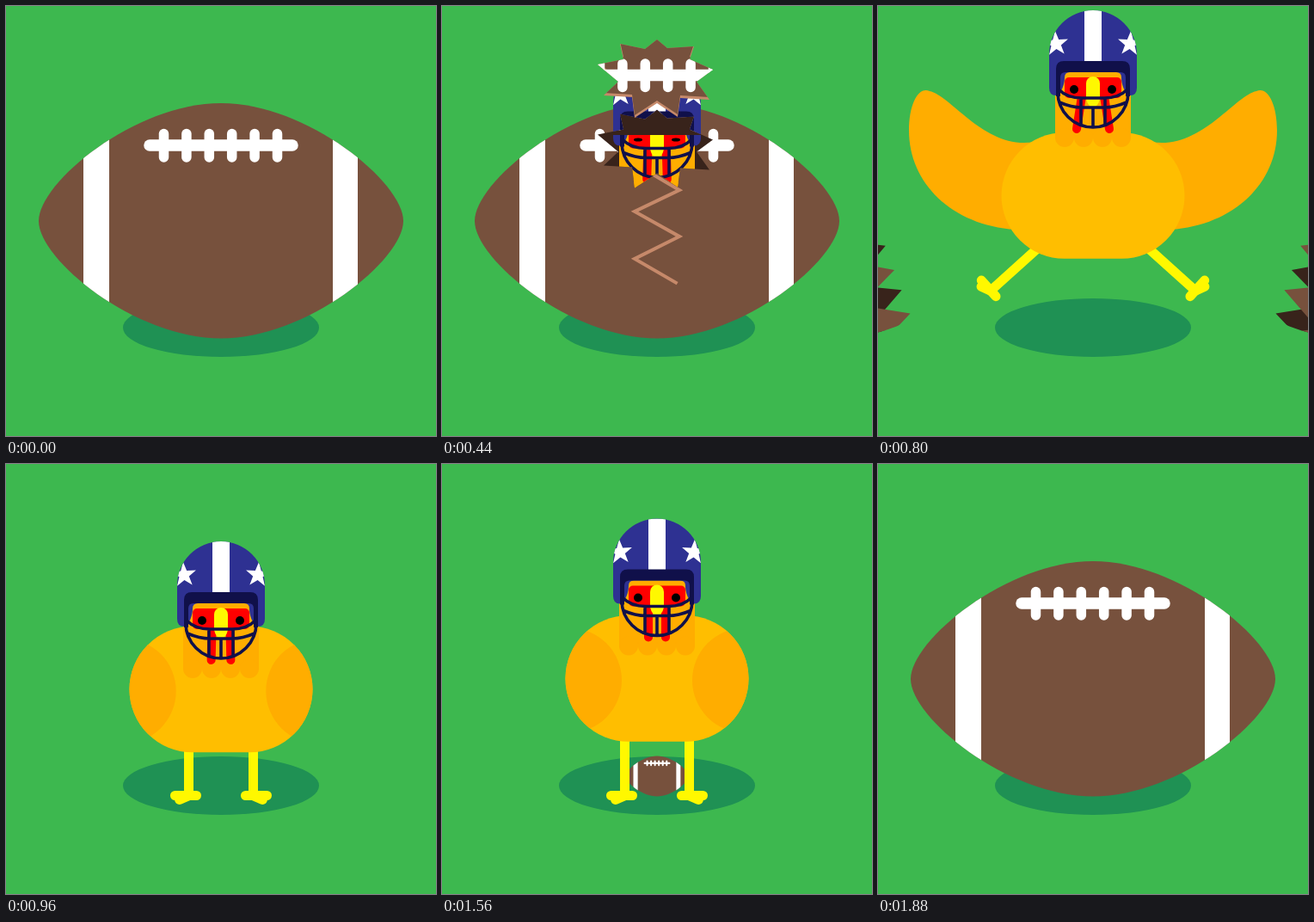
These frames come from a looping animation (500 px wide and 500 px high, 1.92 s). An HTML page with a canvas:

```html
<!DOCTYPE html>
<html>
<head>
<meta charset="utf-8">
<style>
html, body { margin: 0; width: 100%; height: 100%; overflow: hidden; background: #3db84f; }
canvas { display: block; width: 500px; height: 500px; }
</style>
</head>
<body>
<canvas id="stage" width="500" height="500"></canvas>
<script>
const c = document.getElementById('stage').getContext('2d');
const LOOP = 1920, STEP = 40, GROUND = 386.5, EGG = 0.172;
const GRASS = '#3db84f', SHADE = '#1f9154', LEATHER = '#77513d', DARK = '#38231b', TAN = '#c6896a',
  BODY = '#ffbe00', WING = '#ffad00', YELLOW = '#fff800', RED = '#ff0000', BLUE = '#2e3192', NAVY = '#10104a';

const ballPath = new Path2D('M38 250C38 205 150 113 250 113S462 205 462 250S350 386.5 250 386.5S38 295 38 250Z');
const wingPath = new Path2D('M182 158C125 168 85 104 60 99C48 93 36 112 36 145C36 205 85 255 160 260L220 220Z');
const shellPath = new Path2D('M199 51A51 51 0 0 1 301 51V90Q301 99 293 99C286 95 283 86 283 78Q283 72 277 72H223Q217 72 217 78C217 86 214 95 207 99Q199 99 199 90Z');
const brimPath = new Path2D('M207 100V68Q207 59 216 59H284Q293 59 293 68V100H288V78Q288 72 282 72H218Q212 72 212 78V100Z');
const cagePath = new Path2D('M209 92V95A41 41 0 0 0 291 95V92M210 92Q220 102 237 102H263Q280 102 290 92M211 107Q225 113 237 113H263Q275 113 289 107M236 102V133M250 113V136M264 102V133');
const beakPath = new Path2D('M242 85A8 8 0 0 1 258 85V103Q256 112 250 113Q244 112 242 103Z');

// Jagged lid, anticlockwise from its top; the first ten points are its left side.
const lidPoints = [[250, 39], [236, 50], [207, 44], [211, 62], [181, 68], [205, 88], [188, 104], [221, 106],
  [224, 130], [250, 113], [274, 129], [277, 107], [311, 109], [296, 88], [315, 74], [288, 62], [293, 47], [262, 49]]
  .map(([x, y]) => [x, y + 81.5]);
const zigzag = side => [214, 239, 268, 294, 324, 349, 378, 404].map((y, i) => [250 + 26 * side * (i % 2 ? -1 : 1), y]);

function poly(points, closed = true) {
  const p = new Path2D();
  points.forEach(([x, y]) => p.lineTo(x, y));
  if (closed) p.closePath();
  return p;
}
const lidPath = poly(lidPoints);
const crackPath = poly([[242, 194], ...zigzag(1).slice(0, 7)], false);
const cut = side => poly([[-50, 0], [250, 0], ...lidPoints.slice(0, 10), ...zigzag(side), [-50, 500]]);
const cuts = { '1': cut(1), '-1': cut(-1) };
const star = new Path2D();
for (let i = 0; i < 10; i++) {
  const a = i * Math.PI / 5 - Math.PI / 2 - 0.07, r = i % 2 ? 6 : 15;
  star.lineTo(207 + r * Math.cos(a), 39 + r * Math.sin(a));
}

// time, body centre, helmet top, wing spread, leg spread
const poses = [
  [600, 270, 55, 0, 0], [800, 220.5, 5, 1, 1], [840, 220.5, 5, 1, 1], [960, 262, 90, 0.15, 0],
  [1080, 246, 60, 0, 0], [1160, 250, 70, 0, 0], [1280, 268, 95, 0, 0], [1420, 244, 54, 0, 0], [1560, 249.5, 63.5, 0, 0]
];

const clamp = u => Math.max(0, Math.min(1, u));
const span = (t, a, b) => clamp((t - a) / (b - a));
const mix = (a, b, u) => a + (b - a) * u;
const inOut = u => u < 0.5 ? 2 * u * u : 1 - 2 * (1 - u) ** 2;

function poseAt(t) {
  let i = 0;
  while (i < poses.length - 2 && t >= poses[i + 1][0]) i++;
  const a = poses[i], b = poses[i + 1], u = inOut(span(t, a[0], b[0]));
  return a.slice(1).map((v, j) => mix(v, b[j + 1], u));
}

function fill(color, path) { c.fillStyle = color; c.fill(path); }
function stroke(color, width, path) { c.strokeStyle = color; c.lineWidth = width; c.stroke(path); }
function line(x1, y1, x2, y2, width, color) {
  stroke(color, width, poly([[x1, y1], [x2, y2]], false));
}
function oval(x, y, rx, ry, color) {
  c.fillStyle = color;
  c.beginPath();
  c.ellipse(x, y, rx, ry, 0, 0, 7);
  c.fill();
}
function layer(draw) { c.save(); draw(); c.restore(); }
function both(draw) {
  for (const side of [1, -1]) layer(() => {
    if (side < 0) c.transform(-1, 0, 0, 1, 500, 0);
    draw(side);
  });
}
function scaleAt(x, y, s) { c.translate(x, y); c.scale(s, s); c.translate(-x, -y); }

const shadow = () => oval(250, 374, 114, 34, SHADE);

function laces() {
  line(167, 162, 333, 162, 13.5, '#fff');
  for (let i = 0; i < 6; i++) line(183.5 + i * 26.4, 148.5, 183.5 + i * 26.4, 176, 11.5, '#fff');
}

function ball() {
  layer(() => {
    fill(LEATHER, ballPath);
    c.clip(ballPath);
    c.fillStyle = '#fff';
    c.fillRect(90, 100, 30, 300);
    c.fillRect(380, 100, 29, 300);
  });
  laces();
}

function halves(k) {
  both(side => {
    c.translate(250 - 234 * k, GROUND - 12 * k);
    c.rotate(-20 * k * Math.PI / 180);
    c.translate(-250, -GROUND);
    layer(() => { c.clip(cuts[-side]); fill(DARK, ballPath); });
    c.clip(cuts[side]);
    ball();
  });
}

function lid(lift) {
  c.translate(0, -lift);
  fill(TAN, lidPath);
  c.clip(lidPath);
  c.translate(0, -3);
  fill(LEATHER, lidPath);
  c.translate(0, 3);
  laces();
}

function leg(spread) {
  c.translate(mix(212.5, 131, spread), mix(385.5, 331, spread));
  c.rotate(spread * 48 * Math.PI / 180);
  line(0, 0, 0, -98, 11, YELLOW);
  line(-16, 0, 9, 0, 11, YELLOW);
  line(-10.8, 5, 3, -1, 11, YELLOW);
}

function torso(y, wing, spread, zoomPush) {
  both(() => {
    c.translate(200, y);
    c.rotate(-(1 - wing) * Math.PI / 3);
    c.scale(wing, wing);
    c.translate(-200, -220.5);
    fill(WING, wingPath);
  });
  both(() => {
    c.translate(-zoomPush, zoomPush * 20 / 26);
    leg(spread);
  });
  c.translate(0, -zoomPush * 10 / 26);
  const shape = new Path2D();
  shape.roundRect(143.5, y - 73.3, 213, 146.6, 73.3);
  fill(BODY, shape);
  c.clip(shape);
  both(() => oval(148 - 75 * wing, y + 2, 61, 61, WING));
}

function head(y, splay, blink) {
  c.translate(0, y);
  c.fillStyle = WING;
  c.fillRect(206, 65, 88, 84);
  both(() => {
    oval(217, 148, 11, 11, WING);
    oval(239, 148, 11, 11, WING);
  });
  both(() => line(240 - 3 * splay, 100, 240 - 9 * splay, 138, 10, RED));
  c.fillStyle = RED;
  c.beginPath();
  c.roundRect(217, 78, 66, 24, 5);
  c.fill();
  both(() => oval(228, 92, 5, blink ? 2 : 5, '#000'));
  fill(YELLOW, beakPath);
  fill(BLUE, shellPath);
  layer(() => {
    c.clip(shellPath);
    c.fillStyle = '#fff';
    c.fillRect(240, 0, 20, 62);
    both(() => fill('#fff', star));
  });
  fill(NAVY, brimPath);
  c.lineCap = 'butt';
  stroke(NAVY, 3.6, cagePath);
}

function hatch(t) {
  const lift = 90 * (1 - (1 - span(t, 320, 560)) ** 3.4);
  shadow();
  ball();
  c.lineCap = 'butt';
  layer(() => {
    c.lineJoin = 'miter';
    c.setLineDash([560 * span(t, 0, 300), 2000]);
    if (t > 0 && !lift) stroke(TAN, 3, lidPath);
    c.setLineDash([390 * span(t, 320, 492), 2000]);
    if (lift) stroke(TAN, 4, crackPath);
  });
  c.lineCap = 'round';
  if (!lift) return;
  fill(DARK, lidPath);
  layer(() => {
    const open = new Path2D(lidPath);
    open.rect(0, 0, 500, 150);
    c.clip(open);
    head(145 - lift, 0.2, t < 520);
  });
  layer(() => lid(lift));
}

function hen(t) {
  const [y, top, wing, spread] = poseAt(t);
  const p = inOut(span(t, 1560, 1880)), zoom = mix(1, 1 / EGG, p), push = 208 * p ** 3;
  layer(() => {
    c.globalAlpha = 1 - span(t, 1640, 1800);
    scaleAt(250, GROUND, zoom);
    shadow();
  });
  if (t >= 1320) layer(() => {
    c.translate(0, -52 * (1 - span(t, 1320, 1440) ** 2));
    scaleAt(250, GROUND, EGG * zoom);
    if (t >= 1440) shadow();
    ball();
  });
  if (t >= 1840) return;
  layer(() => {
    scaleAt(250, GROUND, zoom);
    layer(() => torso(y, wing, spread, push / zoom));
    const k = (t - 600) / 200;
    if (k < 1.4) halves(k);
    layer(() => {
      c.translate(0, -push / zoom * 10 / 26);
      head(top, wing, false);
    });
    if (t < 760) layer(() => lid(90 + (t - 600) * 1.5));
  });
}

function frame(now) {
  const t = Math.floor(now % LOOP / STEP) * STEP;
  c.fillStyle = GRASS;
  c.fillRect(0, 0, 500, 500);
  c.lineCap = c.lineJoin = 'round';
  layer(() => t <= 600 ? hatch(t) : hen(t));
  requestAnimationFrame(frame);
}
let start;
requestAnimationFrame(function first(now) {
  start = now;
  const tick = () => frame(performance.now());
  tick();
});
</script>
</body>
</html>
```
